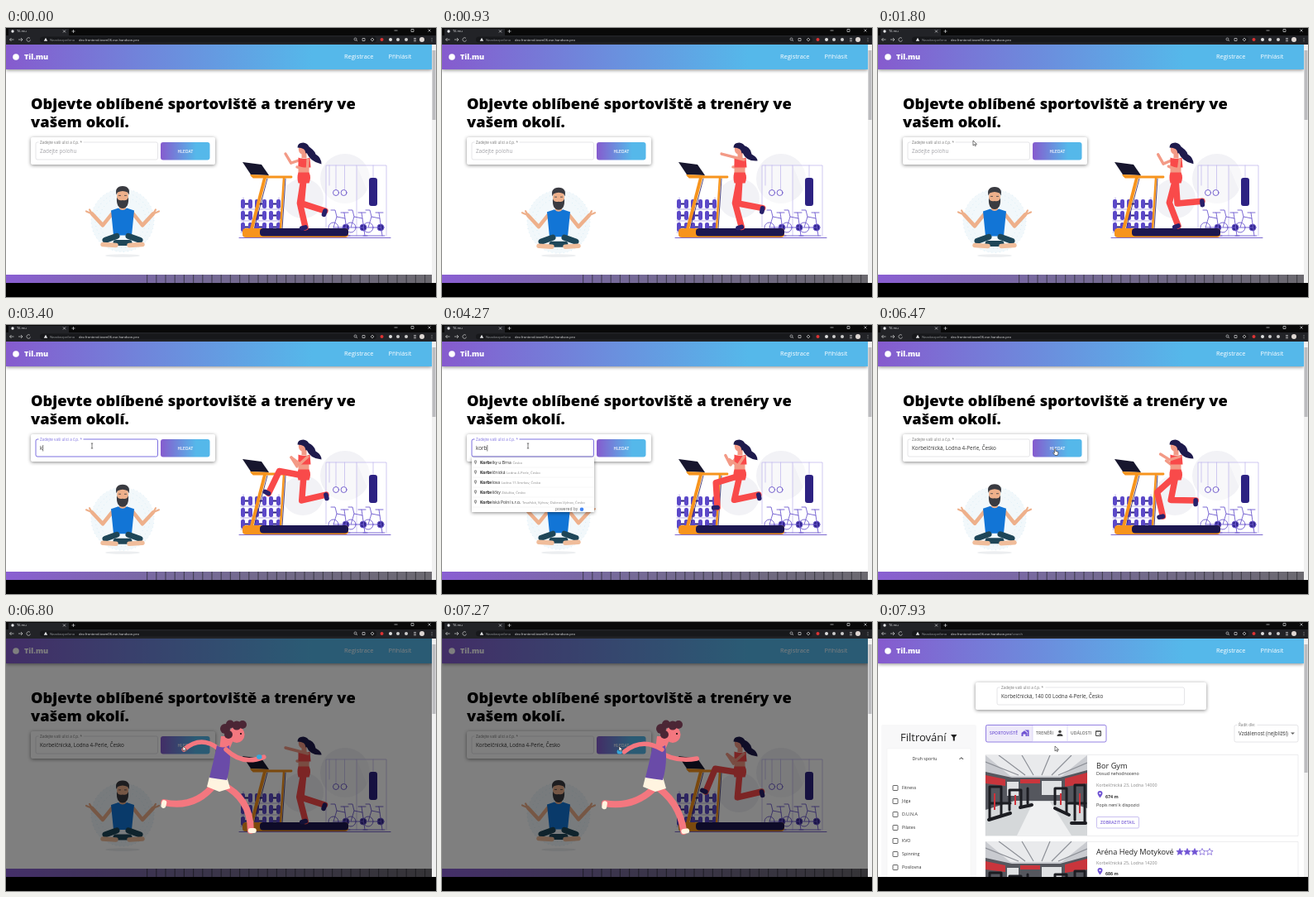
Recreate the animation shown at these times as an HTML page. Size 520 by 325 pixels, loop 8000 ms.

```html
<!DOCTYPE html>
<html lang="cs">
<head>
<meta charset="utf-8">
<style>
html, body { margin: 0; height: 100%; overflow: hidden; background: #000 }
svg { display: block; width: 520px; height: 325px; font-family: "Open Sans", sans-serif }
.caps { font-weight: 600; letter-spacing: .2px }
.shadow { filter: drop-shadow(0 1px 2px #0007) }
.field { fill: #fff; stroke: #d4d4d8; stroke-width: .6 }
.line { fill: none; stroke: #7a62dc; stroke-width: .8 }
.round { fill: none; stroke-linecap: round; stroke-linejoin: round }
</style>
</head>
<body>
<svg viewBox="0 0 520 325">
<defs>
  <linearGradient id="brand"><stop stop-color="#865bce"/><stop offset=".72" stop-color="#55b8ea"/></linearGradient>
  <linearGradient id="strip"><stop stop-color="#8a5fd3"/><stop offset=".38" stop-color="#776a9c"/><stop offset="1" stop-color="#6b696f"/></linearGradient>
  <g id="pin"><path d="M0 4Q-3 0-3-1.6A3 3 0 0 1 3-1.6Q3 0 0 4Z"/><circle cy="-1.4" r="1.1" fill="#fff"/></g>
  <clipPath id="frame"><path d="M0 0h123v97H0z"/></clipPath>
  <g id="photo" clip-path="url(#frame)">
    <path fill="#c9cbd0" d="M0 0h123v97H0z"/>
    <path fill="#e9eaec" d="M0 0h123L92 25H30z"/>
    <path stroke="#8d9097" stroke-width="1.2" d="M0 8 40 24M16 0 48 24M44 0 58 24M78 0 68 24M104 0 80 24M123 9 88 24"/>
    <path fill="#55575e" d="M0 20 32 27H90L123 18V66H0z"/>
    <path fill="#c9353c" d="M0 24 24 29V37L0 34zM42 29H66V34H42zM96 28 123 21V34L96 38z"/>
    <path fill="#dfe1e3" d="M26 32H40V49H26zM68 31H92V48H68z"/>
    <path fill="#d5d8da" d="M0 66 35 55H95L123 64V97H0z"/>
    <path fill="#eff0f1" d="M38 97 58 56H78L104 97z"/>
    <path class="round" stroke="#1c1d22" stroke-width="3" d="M5 76V38H19V72M5 58H30M29 66V42H43V62M51 58V40M84 59V40H98V70M108 78V36H120V80M100 58H121"/>
    <path class="round" stroke="#1c1d22" stroke-width="4" d="M4 78 30 70M42 63 56 60M84 64 101 72M104 82H121"/>
    <path stroke="#d03139" stroke-width="2" d="M11 46V66M36 48V60M91 46V60M114 46V70"/>
  </g>
</defs>

<rect width="515" height="308" y="20" fill="#fff"/>

<g id="home">
  <g font-size="18.300" font-weight="800"><text x="30" y="98">Objevte oblíbené sportoviště a trenéry ve</text><text x="30" y="119.500">vašem okolí.</text></g>
  <path fill="url(#strip)" d="M0 298h515v10H0z"/>
  <path stroke="#25252b" stroke-opacity=".6" stroke-width="10" stroke-dasharray="1.200 10" d="M170 303H515"/>

  <g id="gym">
    <g fill="#f2f2f6"><circle cx="410" cy="182" r="30"/><ellipse cx="359" cy="206" rx="25" ry="24"/></g>
    <g class="round" stroke="#c3baee" stroke-width=".8">
      <path fill="#fff" fill-opacity=".5" d="M387 251V166H424V251M424 166H460V251"/>
      <path d="M391 166V190M399 166V195M409.500 166V195M444 166V181"/>
      <path stroke="#5a41c4" d="M282 253.500H465"/>
      <g stroke="#5a41c4"><circle cx="399" cy="199" r="3.500"/><circle cx="408.500" cy="199" r="3.500"/></g>
    </g>
    <rect x="439" y="181" width="10" height="34" rx="3" fill="#2d2282"/>
    <g id="bikes" class="round" stroke="#6f5bd0" stroke-width=".9"></g>
    <g id="rack"></g>
    <g class="round" stroke="#f7941d">
      <path stroke-width="4" d="M313 181 297 243"/>
      <path stroke-width="2.500" d="M336 181 332 243"/>
      <path stroke="#2a1c5e" stroke-width=".8" d="M316 182 300 243M338 182 334 243"/>
      <path stroke-width="2.800" d="M299 180H345"/>
    </g>
    <path fill="#17162e" d="M286 162 309 165 318 178 296 177Z"/><path fill="#f7941d" d="M295 177 318 178 316 180H297z"/>
    <rect x="286" y="242" width="128" height="11" rx="4" fill="#f7941d"/>
    <rect x="307" y="242" width="107" height="9.500" rx="4" fill="#1c1750"/>
  </g>
  <g id="woman"></g>

  <ellipse cx="141" cy="275" rx="21" ry="1.800" fill="#eceef0"/>
  <g id="yogi">
    <circle cx="141" cy="232" r="38" fill="#f2f8fb"/>
    <g fill="none" stroke="#b9dff0" stroke-width=".6" stroke-dasharray=".8 4"><circle cx="141" cy="232" r="38"/><circle cx="141" cy="232" r="33"/><circle cx="141" cy="232" r="28"/></g>
    <path class="round" stroke="#eeb08b" stroke-width="4.500" d="M129 223 117 238 104 224M153 223 165 238 178 224"/>
    <path class="round" stroke="#eeb08b" stroke-width="2.200" d="M104 224 97 221M104 224 101 219M178 224 185 221M178 224 181 219"/>
    <path fill="#eeb08b" d="M137 209h8v12h-8z"/>
    <path fill="#1275d6" d="M127 220 136 217Q141 222 146 217L155 220 152 250H130Z"/>
    <path class="round" stroke="#1e4658" stroke-width="7" d="M134 251 120 256M148 251 162 256M133 259H149"/>
    <path class="round" stroke="#f0bd9b" stroke-width="5.500" d="M117 261 133 262M165 261 149 262"/>
    <ellipse cx="141" cy="202.500" rx="7" ry="9" fill="#eeb08b"/>
    <path fill="#3a3b41" d="M133.500 201Q131 191 141 190.500Q151 191 148.500 201L147 198Q141 195 135 198ZM134 204Q136 209 141 207.500Q146 209 148 204Q149 217 141 217.500Q133 217 134 204Z"/>
    <path stroke="#3a3b41" stroke-width=".8" d="M136 202h3M143 202h3"/>
  </g>

  <rect class="shadow" x="30" y="132" width="223" height="33" rx="2" fill="#fff"/>
  <rect id="box" class="field" x="36" y="138" width="147.500" height="21" rx="2"/>
  <path fill="#fff" d="M39.500 137h54v2h-54z"/>
  <text id="label" x="41" y="139.500" font-size="4.600">Zadejte vaši ulici a č.p. *</text>
  <text id="value" x="41" y="151" font-size="6.300"></text>
  <path id="caret" stroke="#222" stroke-width=".6" d="M0 145v7.500"/>
  <rect x="187" y="138" width="59.500" height="21.500" rx="3" fill="url(#brand)"/>
  <text class="caps" x="217" y="150.500" font-size="4.800" fill="#fff" text-anchor="middle">HLEDAT</text>
  <g id="list"></g>
</g>

<g id="results" font-size="5.300" fill="#333">
  <rect class="shadow" x="118" y="73" width="279" height="33" rx="2" fill="#fff"/>
  <rect class="field" x="144" y="79" width="226.500" height="21" rx="2"/><path fill="#fff" d="M147.500 78h55v2h-55z"/>
  <text x="149" y="80.700" font-size="4.600" fill="#777">Zadejte vaši ulici a č.p. *</text>
  <text x="149" y="92" font-size="6.300">Korbelčnická, 140 00 Lodna 4-Perle, Česko</text>
  <rect x="4" y="124" width="115" height="190" rx="2" fill="#f8f8f9"/>
  <rect x="11" y="153" width="101" height="160" fill="#fff" stroke="#eee" stroke-width=".5"/>
  <text x="27" y="144" font-size="13" fill="#222">Filtrování</text>
  <path fill="#222" d="M88 136h7.500l-2.700 3.500v4h-2v-4z"/>
  <text x="56.500" y="167" text-anchor="middle">Druh sportu</text>
  <path fill="none" stroke="#333" d="m98.500 166 2.300-2.300 2.300 2.300"/>
  <g id="sports"></g>
  <path fill="#eeeafa" d="M130 124h57v21h-57z"/>
  <rect class="line" x="130.500" y="124.500" width="145.500" height="20.500" rx="2"/>
  <path stroke="#cfc6f3" stroke-width=".6" d="M187 125v20M229 125v20"/>
  <g class="caps" font-size="4.900" fill="#666"><text x="135" y="136.300" fill="#7054d4">SPORTOVIŠTĚ</text><text x="191" y="136.300">TRENÉŘI</text><text x="233" y="136.300">UDÁLOSTI</text></g>
  <path fill="#7054d4" d="M173.500 138v-4l3.500-2.800 3.500 2.800v4h-2v-2.500h-3v2.500zM177.500 130.500h5v7.500h-1.500v-5z"/>
  <g fill="#444"><circle cx="220" cy="132.500" r="1.800"/><path d="M216.500 138q0-3 3.500-3t3.500 3z"/></g>
  <path fill="none" stroke="#444" d="M263.500 132h6v5.500h-6zM263 132h7M267 135.500h1.500"/>
  <rect class="field" x="431" y="124.500" width="77" height="20.500" rx="2"/><path fill="#fff" d="M434.500 123.500h24v2h-24z"/>
  <text x="436" y="126" font-size="4.600" fill="#777">Řadit dle:</text>
  <text x="436" y="137" font-size="6.200">Vzdálenost (nejbližší)</text>
  <path fill="#666" d="M499 133.500h5l-2.500 2.500z"/>
  <path fill="none" stroke="#e6e6e9" stroke-width=".7" d="M130 160.500H508V258.500H130zM130 265.500H508V320H130z"/>
  <use href="#photo" x="130" y="161"/><use href="#photo" x="130" y="265"/>
  <text x="264" y="177" font-size="9.200" fill="#222">Bor Gym</text>
  <text x="264" y="185.200">Dosud nehodnoceno</text>
  <text x="264" y="198.800" fill="#888">Korbelčnická 23, Lodna 14000</text>
  <use href="#pin" x="268.500" y="208.500" fill="#7054d4"/><text x="275" y="212.800" font-weight="700">674 m</text>
  <text x="264" y="222.800">Popis není k dispozici</text>
  <rect x="264.500" y="235.500" width="51" height="13.500" rx="1.500" fill="none" stroke="#b4a6ea" stroke-width=".7"/>
  <text class="caps" x="290" y="244" font-size="4.700" fill="#7054d4" text-anchor="middle">ZOBRAZIT DETAIL</text>
  <text x="264" y="281" font-size="9.200" fill="#222">Aréna Hedy Motykové</text>
  <g id="stars" stroke="#7054d4" stroke-width=".7"></g>
  <text x="264" y="292.500" fill="#888">Korbelčnická 25, Lodna 14200</text>
  <use href="#pin" x="268.500" y="301.500" fill="#7054d4"/><text x="275" y="306" font-weight="700">686 m</text>
</g>

<g class="shadow"><rect y="20" width="515" height="30" fill="url(#brand)"/></g>
<g fill="#fff">
  <circle cx="12" cy="35" r="3.800"/><text x="22" y="38" font-size="9.100" font-weight="800">Til.mu</text>
  <g font-size="7.400"><text x="409" y="37.300">Registrace</text><text x="462.500" y="37.300">Přihlásit</text></g>
</g>

<g id="loading"><path d="M0 20h515v288H0z" fill-opacity=".5"/><g id="runner"></g></g>

<path fill="#f1f1f1" d="M515 20h5v288h-5z"/><rect id="thumb" x="515.500" y="27" width="4" fill="#bcbcbf"/>
<path d="M0 308h520v17H0z"/>

<path fill="#090909" d="M0 0h520v9H0z"/><path fill="#222327" d="M3 1h73v8h444v11H0V9h3z"/>
<rect x="41" y="10.500" width="407" height="7" rx="3.500" fill="#17181b"/>
<g fill="#e4e5e7" font-size="4.100">
  <circle cx="8" cy="4" r="1.700"/><text x="13" y="5.300">Til.mu</text>
  <text x="53" y="15.500" fill="#96989c">Nezabezpečeno</text><text x="88" y="15.500">dev.frontend.team06.vse.handson.pro<tspan id="path" fill="#96989c">/search</tspan></text>
  <path d="M48 11.800l2.200 4h-4.400z"/>
  <circle cx="454.500" cy="14" r="2" fill="#d33"/><circle cx="465" cy="14" r="2" fill="#ddd"/><circle cx="474" cy="14" r="2" fill="#ccc"/><circle cx="484" cy="14" r="2" fill="#ccc"/><circle cx="503" cy="14" r="3" fill="#ddd6d2"/>
</g>
<path fill="none" stroke="#d0d1d3" stroke-width=".7" d="M69 2.500l3 3m0-3-3 3M79.500 4h4m-2-2v4M4.500 14h5m-5 0 2-2m-2 2 2 2M15 14h5m0 0-2-2m2 2-2 2M29 12.500a2.300 2.300 0 1 0 .5 2M421 13.500a1.500 1.500 0 1 0 3 0a1.500 1.500 0 1 0-3 0m2.600 1 1.300 1.500M431 15.500h3v-3h-3zM441 14l2-2 2 2-2 2zM493 12.500h3m-3 1.700h3m-3 1.700h3M469.500 3h4M490 1.500h3v3h-3zM510.500 1.500l3 3m0-3-3 3M515 12v.8m0 1v.8m0 1v.8"/>

<path id="cursor" fill="#fff" stroke="#222" stroke-width=".6"/>
</svg>

<script>
const LOOP = 8000, STRIDE = 971;
const $ = id => document.getElementById(id);
const repeat = (n, f) => Array.from({ length: n }, (_, i) => f(i)).join('');
const show = (id, on) => $(id).style.display = on ? '' : 'none';

// Keys are [time, x, y]
function along(keys, t, ease = v => v) {
  let i = keys.findIndex(k => k[0] > t);
  if (i < 0) return keys.at(-1).slice(1);
  if (!i) return keys[0].slice(1);
  const [t0, x0, y0] = keys[i - 1], [t1, x1, y1] = keys[i];
  const k = ease((t - t0) / (t1 - t0));
  return [x0 + (x1 - x0) * k, y0 + (y1 - y0) * k];
}
const smooth = v => v * v * (3 - 2 * v);

// Middle joint of a limb with two bones of equal length
function joint([ax, ay], [bx, by], bone, bend) {
  const dx = bx - ax, dy = by - ay, d = Math.hypot(dx, dy) || 1;
  const h = Math.sqrt(Math.max(0, bone * bone - d * d / 4)) * bend;
  return [(ax + bx) / 2 - dy / d * h, (ay + by) / 2 + dx / d * h];
}
const stroke = (d, color, width) => `<path class="round" d="${d}" stroke="${color}" stroke-width="${width}"/>`;
function limb(from, to, { bone, bend, color, width, curve = 'L', shoe, toe = 0 }) {
  const mid = joint(from, to, bone, bend);
  let out = stroke(`M${from}${curve}${mid}${curve == 'L' ? 'L' : ' '}${to}`, color, width);
  if (shoe) {
    const dx = to[0] - mid[0], dy = to[1] - mid[1], d = Math.hypot(dx, dy) || 1;
    out += stroke(`M${to}l${[dy / d * toe, -dx / d * toe]}`, shoe, width * .75);
  }
  return out;
}

const STEP = [[0, 386, 221], [.355, 340, 228], [.5, 317, 203], [.66, 344, 231], [.853, 363, 239], [1, 362, 241],
  [1.355, 381, 205], [1.5, 387, 205], [1.66, 384, 212], [1.853, 392, 209], [2, 386, 221]];
function drawWoman(t) {
  const u = t / STRIDE, swing = Math.cos(u * Math.PI);
  const leg = { bone: 30, bend: 1, color: '#f94a4a', width: 7.5, shoe: '#27206b', toe: -4.5 };
  const arm = { bone: 13, bend: -1, color: '#f39a86', width: 3.4 };
  const hip = [360, 182], hand = s => [345 + 7 * s, 160 + 8 * s];
  return limb([357, 159], hand(-swing), arm) +
    limb(hip, along(STEP, (u + 1) % 2), leg) + limb(hip, along(STEP, u % 2), leg) +
    `<g transform="translate(-2.500 -1.500)">
    <path fill="#f39a86" d="M360 151h6v8h-6zM356 166h13v12h-13z"/>
    <path fill="#f94a4a" d="M356 158Q363 161 370 158L371 170H356ZM356 176H369Q372 182 369 189H356Q354 182 356 176Z"/>
    <path fill="#1e1a4c" d="M366 143Q376 ${147 + 2 * swing} 377 154Q384 158 384 ${164 + 2 * swing}Q370 163 366 152Z"/>
    <ellipse cx="361.500" cy="148" rx="5.200" ry="6.200" fill="#f39a86"/>
    <path fill="#1e1a4c" d="M355 146Q355 140 362 140Q371 141 369 152L365 153Q365 146 355 146Z"/></g>` +
    limb([365, 159], hand(swing), arm);
}

const RUN = [[0, 296, 252], [.25, 256, 262], [.5, 191, 218], [.75, 254, 232], [1, 296, 252]];
const REACH = [[0, 312, 163], [.25, 272, 184], [.5, 215, 154], [.75, 272, 184], [1, 312, 163]];
function drawRunner(t) {
  const u = (t - 6800 + 9000) / 900, other = (u + .5) % 1;
  const leg = { bone: 39, bend: -1, color: '#f4777f', width: 8, curve: 'Q', shoe: '#fff4e0', toe: 4 };
  const arm = { bone: 28, bend: 1, color: '#f4777f', width: 5.5, curve: 'Q' };
  const near = along(REACH, u % 1), far = along(REACH, other);
  return limb([258, 154], far, arm) + limb([253, 195], along(RUN, other), leg) + limb([261, 196], along(RUN, u % 1), leg) +
    `<path fill="#f4777f" d="M260 138H277L270 154H258Z"/>
    <path fill="#fff4e0" d="M246 187H267L271 201 258 205 243 199Z"/>
    <path fill="#6a4ba8" d="M255 149Q262 154 270 149Q273 170 267 191L246 188Q251 168 255 149Z"/>
    <ellipse cx="279" cy="136" rx="9.500" ry="10" fill="#f4777f"/>
    <g fill="#4b2635"><circle cx="265" cy="129" r="6"/><circle cx="271" cy="123.500" r="5"/><circle cx="279" cy="125" r="5.500"/><circle cx="286" cy="124" r="5"/><circle cx="269" cy="136" r="5"/></g>
    <circle cx="284" cy="135" r="1"/>` +
    limb([266, 154], near, arm) + stroke(`M${near[0] - 6} ${near[1]}h1`, '#35a8dc', 5.5);
}

const ADDRESS = 'Korbelčnická, Lodna 4-Perle, Česko', TYPED = 'korbe';
const PLACES = [['Korbelky u Brna', 'Česko'], ['Korbelčnická', 'Lodna 4-Perle, Česko'], ['Korbelova', 'Lodna 11-Smrkov, Česko'],
  ['Korbelíčky', 'Zálužka, Česko'], ['Korbelská Polní s.r.o.', 'Tesařská, Vylnov, Dubrov-Vylnov, Česko']];
function drawList(typed, hover) {
  return `<rect class="shadow" x="36" y="160" width="148" height="66" fill="#fff"/>` +
    (hover ? '<path fill="#f1f1f1" d="M36 172h148v12H36z"/>' : '') +
    PLACES.map(([name, area], i) => `<path stroke="#ececec" stroke-width=".5" d="M36 ${172 + 12 * i}h148"/>
      <use href="#pin" fill="#999" transform="translate(40.500 ${166 + 12 * i}) scale(.6)"/>
      <text x="46" y="${168 + 12 * i}" font-size="5" fill="#222"><tspan font-weight="700">${name.slice(0, typed)}</tspan>${name.slice(typed)}<tspan dx="1.500" font-size="4.200" fill="#888">${area}</tspan></text>`).join('') +
    '<text x="137" y="224.300" font-size="5" fill="#666">powered by</text><circle cx="169" cy="222.700" r="2.300" fill="#4285f4"/>';
}

$('rack').innerHTML = '<path class="round" stroke="#b9aee9" stroke-width="1" d="M287 205V252M330 205V252M284 219H333M284 233H333M284 247H333"/>' +
  repeat(9, i => {
    const x = 284 + i % 3 * 17, y = 207 + (i / 3 | 0) * 14;
    return `<g fill="#5b48c8"><rect x="${x}" y="${y}" width="5" height="11" rx="2"/><rect x="${x + 9}" y="${y}" width="5" height="11" rx="2"/></g><path fill="#2a1f80" d="M${x + 5} ${y + 4.5}h4v2h-4z"/>`;
  });
$('bikes').innerHTML = repeat(3, i => `<g transform="translate(${396 + i * 21} 0)"><circle cy="241" r="6"/><circle cx="15" cy="241" r="4" fill="#33278f"/><path d="M0 241 4 228 14 230 17 251M4 228 2 220H-3M14 230 13 223H9M13 223H18M0 241H15M-6 251H20"/></g>`);
$('sports').innerHTML = ['Fitness', 'Jóga', 'D.U.N.A', 'Pilates', 'KVO', 'Spinning', 'Posilovna'].map((name, i) =>
  `<rect x="18" y="${197.5 + 16 * i}" width="6" height="6" rx=".6" fill="none" stroke="#555" stroke-width=".9"/><text x="29" y="${202.3 + 16 * i}">${name}</text>`).join('');
$('stars').innerHTML = repeat(5, i => `<path fill="${i < 3 ? '#7054d4' : 'none'}" d="M${365 + i * 9} 273.500l1.200 2.700 2.900.3-2.200 1.900.7 2.900-2.600-1.500-2.600 1.500.7-2.900-2.200-1.900 2.900-.3z"/>`);

const POINTER = [[1000, 300, -8], [1600, 119, 133], [1800, 115, 136], [2300, 104, 146], [4400, 104, 146],
  [5000, 111, 177], [5600, 111, 177], [6300, 214, 150]];
const ARROW = 'M0 0v6l1.500-1.300 1 2 1-.5-1-1.900h2z';
const BEAM = 'M-1.200-3h2.400M0-3v6M-1.200 3h2.400';
const HAND = 'M-.6 0q.8-.8 1.400 0v2.500l3 .8v2.200l-.8 2h-3l-2.300-3 .8-.6.9.8z';

function render(t) {
  const found = t >= 7400, focused = t >= 2900 && t < 5600, chosen = t >= 5600;
  const letters = [3300, 3600, 3850, 4100, 4400].filter(k => k <= t).length;
  show('home', !found);
  show('results', found);
  show('path', found);
  $('thumb').setAttribute('height', found ? 155 : 84);

  $('woman').innerHTML = drawWoman(t);
  $('yogi').setAttribute('transform', `translate(0 ${1.4 - Math.cos(t / 2400 * 2 * Math.PI)})`);

  const value = $('value');
  value.textContent = chosen ? ADDRESS : TYPED.slice(0, letters) || 'Zadejte polohu';
  value.setAttribute('fill', letters ? '#333' : '#a3a3a8');
  $('box').style.stroke = focused ? '#7d70e0' : '';
  $('box').style.strokeWidth = focused ? 1 : '';
  $('label').setAttribute('fill', focused ? '#7d70e0' : '#777');
  show('caret', focused && (t - 2900) % 1000 < 600);
  $('caret').setAttribute('transform', `translate(${41.4 + (letters && !found ? value.getComputedTextLength() : 0)} 0)`);
  $('list').innerHTML = t >= 3800 && !chosen ? drawList(letters, t > 4900) : '';

  const loading = t >= 6550 && !found;
  show('loading', loading);
  if (loading) {
    $('loading').style.opacity = Math.min(1, (t - 6550) / 200);
    $('runner').innerHTML = drawRunner(t);
  }

  const cursor = $('cursor');
  show('cursor', t >= 1000);
  cursor.setAttribute('transform', `translate(${along(POINTER, t, smooth)})`);
  cursor.setAttribute('d', t > 2050 && t < 4600 ? BEAM : t >= 4600 && t < 5700 || t > 6150 && t < 6550 ? HAND : ARROW);
}

function tick() {
  render(performance.now() % LOOP);
  requestAnimationFrame(tick);
}
tick();
</script>
</body>
</html>
```
